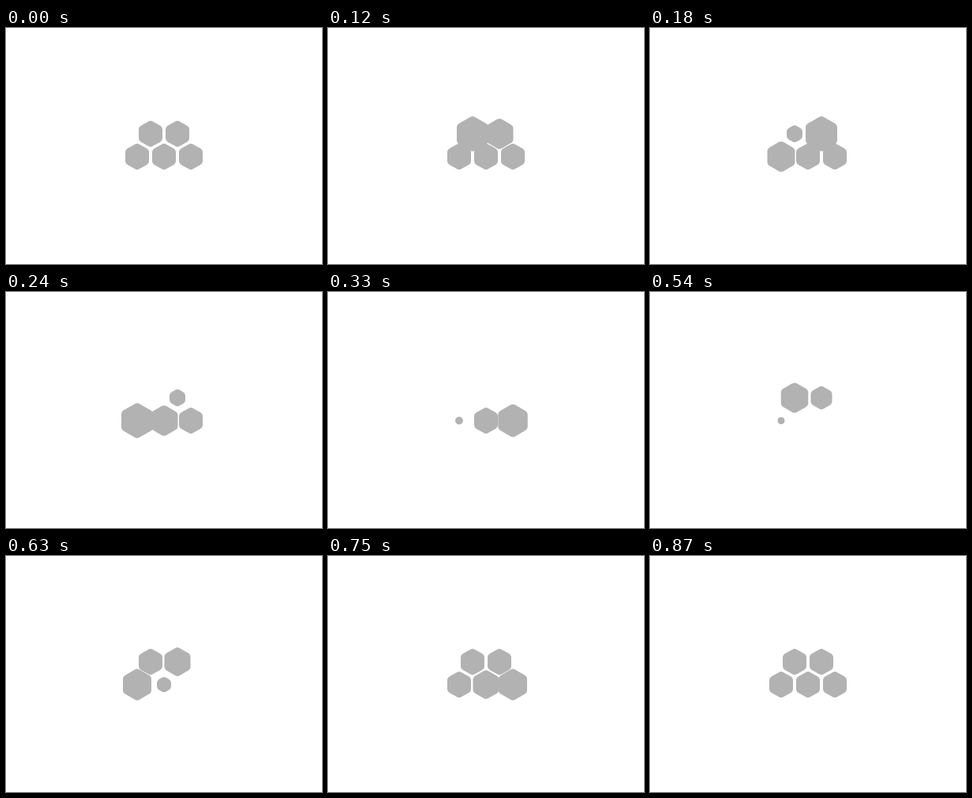
These frames come from a looping animation (400 px wide and 300 px high, 1.54 s). An HTML page with a canvas:

```html
<!DOCTYPE html>
<html>
<head>
<meta charset="utf-8">
<style>
html, body { margin: 0; width: 100%; height: 100%; overflow: hidden; background: #fff; }
canvas { display: block; }
</style>
</head>
<body>
<canvas id="stage" width="400" height="300"></canvas>
<script>
const ctx = document.getElementById('stage').getContext('2d');
const LOOP = 1540, STEP = 30, STAGGER = 60, ENTER = 390;
const APOTHEM = 15, CORNER = 6;
const cells = [[183, 134.5], [217, 134.5], [166, 163.5], [200, 163.5], [234, 163.5]];

const lerp = (a, b, k) => a + (b - a) * Math.min(1, Math.max(0, k));

// Swell and vanish, then pop back in and settle.
function scaleAt(t) {
  if (t < 120) return lerp(1, 4 / 3, t / 120);
  if (t < ENTER) return lerp(4 / 3, 0, (t - 120) / 120);
  t -= ENTER;
  return t < 120 ? lerp(0, 1.2, t / 120) : lerp(1.2, 1, (t - 120) / 120);
}

// The corner radius stays fixed while the hexagon grows or shrinks.
function hexagon(x, y, scale) {
  const apothem = APOTHEM * scale;
  if (apothem <= 0) return;
  const corner = Math.min(CORNER, apothem - 0.01);
  const radius = (apothem - corner) / Math.cos(Math.PI / 6);
  ctx.beginPath();
  for (let i = 0; i < 6; i++) {
    const a = (i + 0.5) * Math.PI / 3;
    ctx.lineTo(x + radius * Math.cos(a), y + radius * Math.sin(a));
  }
  ctx.closePath();
  ctx.lineWidth = 2 * corner;
  ctx.fill();
  ctx.stroke();
}

function draw(now) {
  const t = Math.floor(now % LOOP / STEP) * STEP;
  ctx.clearRect(0, 0, 400, 300);
  ctx.fillStyle = ctx.strokeStyle = '#b2b2b2';
  ctx.lineJoin = 'round';
  cells.forEach(([x, y], i) => hexagon(x, y, scaleAt(t - i * STAGGER)));
}

const start = performance.now();
function tick() {
  draw(performance.now() - start);
  requestAnimationFrame(tick);
}
tick();
</script>
</body>
</html>
```
